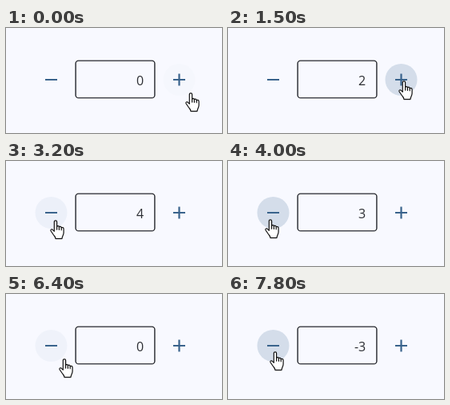
Animation, 270 px wide and 132 px high, one loop 8000 ms. Source, as an HTML page:

```html
<!DOCTYPE html>
<html lang="en">
<head>
<meta charset="utf-8">
<title>Number stepper</title>
<style>
  html, body { margin: 0; width: 100%; height: 100%; overflow: hidden; background: #f8f9ff; }
  svg { display: block; width: 100vw; height: 100vh; }
  .halo { fill: #386791; }
  .icon { fill: none; stroke: #39638c; stroke-width: 2.2; }
  .field { fill: none; stroke: #24262b; stroke-width: 1.4; }
  #value { font: 16px "Open Sans", "Noto Sans", sans-serif; fill: #2c2e33; text-anchor: end; }
  #hand path { fill: #fff; stroke: #111; stroke-width: 1.2; stroke-linejoin: round; stroke-linecap: round; }
</style>
</head>
<body>
<svg viewBox="0 0 270 132">
  <circle id="plusHalo" class="halo" cx="216.5" cy="65" r="20"/>
  <circle id="minusHalo" class="halo" cx="56.5" cy="65" r="20"/>
  <path class="icon" d="M49 65H64M209 65H224M216.5 57.5V72.5"/>
  <rect class="field" x="87.1" y="41.1" width="98.8" height="46.8" rx="3.5"/>
  <text id="value" x="172.2" y="72">0</text>
  <g id="hand">
    <path d="M5.3 14.4V2.5C5.3 .2 8.6 .2 8.6 2.5V8.4C9.2 7.2 11.4 7.3 11.4 9C12.1 8 14.2 8.2 14.2 9.9C15 9.1 17.1 9.5 17.1 11.4V16C17.1 19.2 15 20.6 15 23.6H6.9C6.9 21.2 5.5 20.6 4.5 19L1.1 14C.2 12.4 1.9 11.1 3.2 12.3Z"/>
    <path d="M8.6 8.4V12.2M11.4 9V12.4M14.2 9.9V12.8"/>
  </g>
</svg>
<script>
const LOOP = 8000, STEP = 100;
const HOVER = 0.08, PRESS = 0.11;

const START = { x: 224, y: 81 };
const moves = [
  { from: 200, to: 700, x: 213, y: 66 },
  { from: 2600, to: 3300, x: 46, y: 73, sag: 9 },
  { from: 5800, to: 6100, x: 72, y: 77 },
  { from: 6300, to: 6400, x: 66, y: 81 },
  { from: 6400, to: 6600, x: 52, y: 72 }
];
const byId = id => document.getElementById(id);
const buttons = [
  { halo: byId("plusHalo"), x: 216.5, entered: -100, change: 1, clicks: [1100, 1400, 1700, 2200] },
  { halo: byId("minusHalo"), x: 56.5, entered: 2900, change: -1, clicks: [3900, 4200, 4700, 5000, 6900, 7200, 7700] }
];

const clamp = v => Math.min(1, Math.max(0, v));
const ease = k => k * k * (3 - 2 * k);

function handAt(t) {
  let { x, y } = START;
  for (const m of moves) {
    const k = ease(clamp((t - m.from) / (m.to - m.from)));
    x += (m.x - x) * k;
    y += (m.y - y) * k + (m.sag || 0) * Math.sin(Math.PI * k);
  }
  return { x: Math.round(x), y: Math.round(y) };
}

// A press builds up quickly, holds, then fades back to the hover tint.
const ripple = age => Math.min(clamp(0.6 + age / 250), clamp((450 - age) / 250));

function render(t) {
  const hand = handAt(t);
  byId("hand").setAttribute("transform", `translate(${hand.x} ${hand.y})`);
  let value = 0;
  for (const b of buttons) {
    const done = b.clicks.filter(at => at <= t);
    value += done.length * b.change;
    const distance = Math.hypot(hand.x + 7 - b.x, hand.y + 1 - 65);
    const hover = clamp((28 - distance) / 8) * clamp((t - b.entered) / 400);
    const press = done.length ? ripple(t - done[done.length - 1]) : 0;
    b.halo.style.opacity = HOVER * hover + PRESS * press;
  }
  byId("value").textContent = value;
}

const start = performance.now();
function tick() {
  const t = (performance.now() - start) % LOOP;
  render(Math.floor(t / STEP) * STEP);
  requestAnimationFrame(tick);
}
tick();
</script>
</body>
</html>
```
